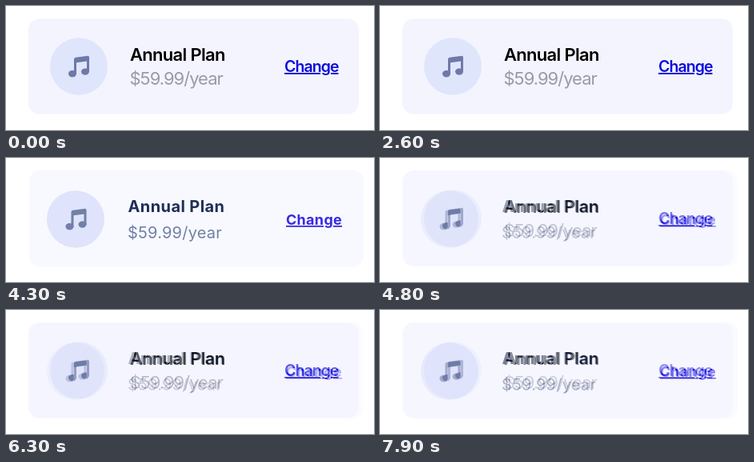
Animation of 460x156 px, one loop 8000 ms. Source, as an HTML page:

```html
<!DOCTYPE html>
<html lang="en">
<head>
<meta charset="utf-8">
<title>Plan card</title>
<style>
  html, body { margin: 0; width: 100%; height: 100%; overflow: hidden; background: #fff; }
  svg { display: block; width: 460px; height: 156px; }
  text { font-family: Inter, "Open Sans", sans-serif; }
  .link { text-decoration: underline; }

  #draft .name { font-size: 22px; font-weight: 600; fill: #000; letter-spacing: -.7px; }
  #draft .price { font-size: 22px; fill: #9a9aa8; letter-spacing: -1px; }
  #draft .link { font-size: 19.5px; font-weight: 600; fill: #0b0bdc; letter-spacing: -.95px; }
  #draft .note { fill: #6f79a8; }

  #design .name { font-size: 20px; font-weight: 700; fill: #1f2f56; letter-spacing: .4px; }
  #design .price { font-size: 20px; fill: #7280a7; letter-spacing: .2px; }
  #design .link { font-size: 18px; font-weight: 700; fill: #382ae1; letter-spacing: .3px; }
  #design .note { fill: #7280a7; }
</style>
</head>
<body>
<svg viewBox="0 0 460 156">
  <defs>
    <g id="note">
      <path d="M85 67Q85 65 87 64.7L102 62.8Q104 62.6 104 64.6V83H101V69.5L88 71.3V86H85Z"/>
      <ellipse cx="83" cy="85.3" rx="5" ry="4.2"/>
      <ellipse cx="99" cy="82.6" rx="5" ry="4.2"/>
    </g>
  </defs>
  <g id="draft">
    <rect x="28" y="16" width="413" height="120" rx="14" fill="#f4f4ff"/>
    <circle cx="91" cy="76" r="36" fill="#dfe5fb"/>
    <use href="#note" class="note"/>
    <text class="name" x="155" y="69">Annual Plan</text>
    <text class="price" x="154.5" y="99">$59.99/year</text>
    <text class="link" x="348" y="83">Change</text>
  </g>
  <g id="design">
    <rect width="460" height="156" fill="#fff"/>
    <rect x="29" y="15" width="418" height="122" rx="14" fill="#f8f9ff"/>
    <circle cx="87" cy="77" r="36" fill="#dfe3fb"/>
    <use href="#note" class="note" x="-3.5" y="1"/>
    <text class="name" x="152.5" y="68">Annual Plan</text>
    <text class="price" x="152" y="101">$59.99/year</text>
    <text class="link" x="350" y="84">Change</text>
  </g>
</svg>
<script>
  const LOOP = 8000, STEP = 100;
  const FIRST_SWAP = 3210, HOLD = 1570, FADE = 320;
  const design = document.getElementById('design');
  const clamp = v => Math.min(1, Math.max(0, v));

  // Each swap is a short crossfade centred on its moment, alternating direction.
  function designOpacity(t) {
    let opacity = 0;
    for (let i = 0, at = FIRST_SWAP; at - FADE / 2 < LOOP; i++, at += HOLD) {
      const progress = clamp((t - at) / FADE + 0.5);
      opacity += i % 2 ? -progress : progress;
    }
    return clamp(opacity);
  }

  const start = performance.now();
  function render() {
    const elapsed = (performance.now() - start) % LOOP;
    const t = Math.floor(elapsed / STEP) * STEP;
    design.setAttribute('opacity', designOpacity(t).toFixed(3));
    requestAnimationFrame(render);
  }
  render();
</script>
</body>
</html>
```
